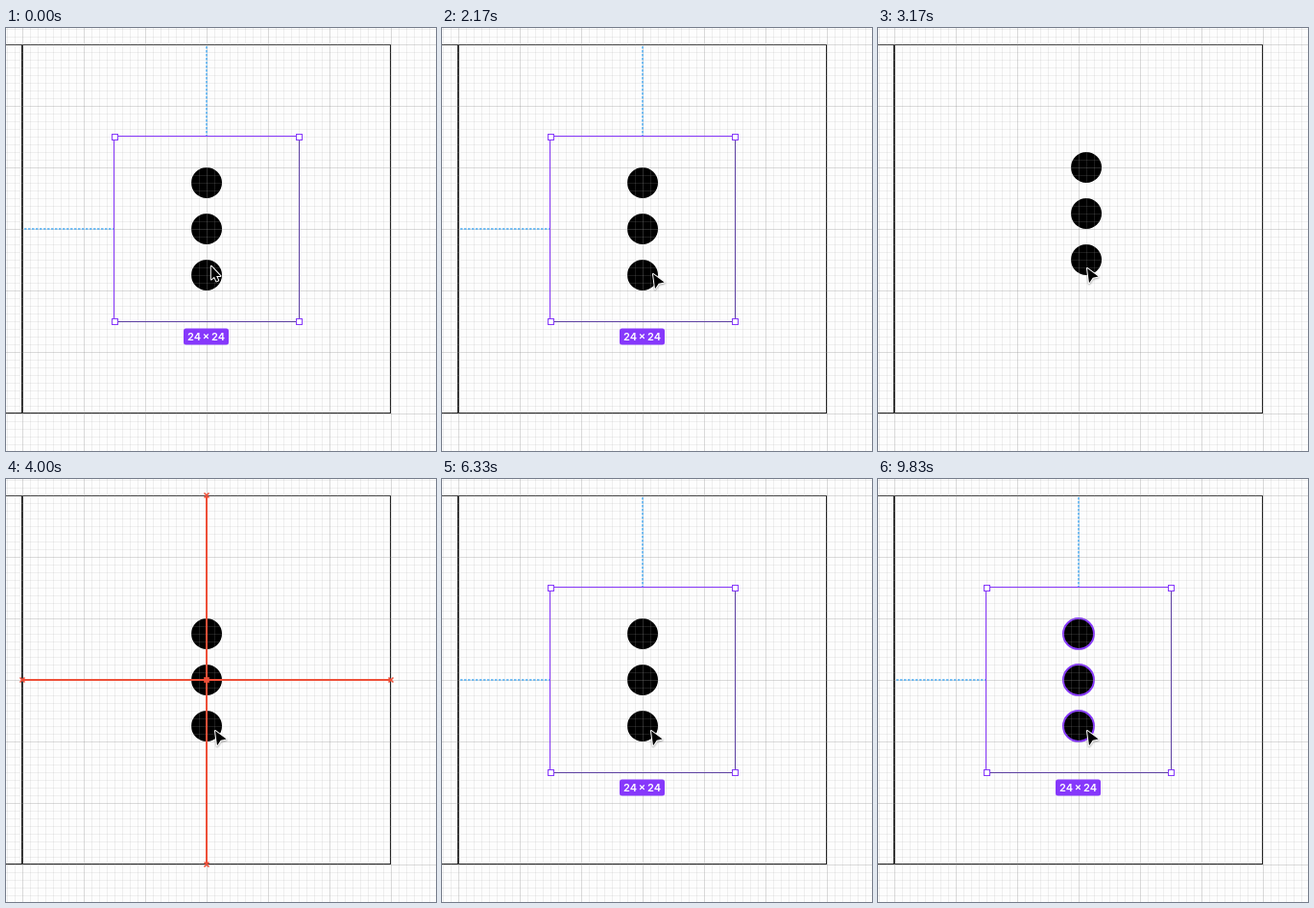
An HTML page with a canvas for the animation above (9.99 s loop, 448x440 px).

```html
<!DOCTYPE html>
<html lang="en">
<head>
<meta charset="utf-8">
<style>
  html, body { margin: 0; width: 100%; height: 100%; overflow: hidden; background: #fdfdfd; }
  canvas { display: block; }
</style>
</head>
<body>
<canvas id="stage" width="448" height="440"></canvas>
<script>
const ctx = document.getElementById('stage').getContext('2d');
const LOOP = 9990, STEP = 1000 / 6;
const CENTER = 209, START = 17, END = 401, SIZE = END - START, UNIT = 8;
const PURPLE = '#8638fb', SHADE = '#5b3fa0', RED = '#ee4f38', BLUE = '#4fadf2';
const GRAB = { x: 213, y: 265 };

const systemArrow = new Path2D('M.8 .8V14.6L4 11.7L6.2 16.4L8.2 15.5L6.1 10.9H10.4Z');
const editorArrow = new Path2D('M1 1L12.6 9.6L6.8 10.8L3 16.2Z');

function ease(t, from, to) {
  const p = Math.min(1, Math.max(0, (t - from) / (to - from)));
  return p * p * (3 - 2 * p);
}

// Drift while hovering, pull up to drag, then bring the icon back to the centre.
function cursorAt(t) {
  const drift = ease(t, 330, 1670), pull = ease(t, 2160, 2500), back = ease(t, 3160, 4000);
  return {
    x: 213 + 6 * drift - 1.7 * pull - .5 * back,
    y: 247 + 8 * drift - 6 * pull + 12 * back
  };
}

const snap = distance => Math.round(distance / UNIT) * UNIT;

function rect(x, y, w, h, color) {
  ctx.fillStyle = color;
  ctx.fillRect(x, y, w, h);
}

function line(x1, y1, x2, y2, color, width = 1, dash = []) {
  ctx.strokeStyle = color;
  ctx.lineWidth = width;
  ctx.setLineDash(dash);
  ctx.beginPath();
  ctx.moveTo(x1, y1);
  ctx.lineTo(x2, y2);
  ctx.stroke();
  ctx.setLineDash([]);
}

function drawFrames() {
  const ink = '#242424';
  rect(0, START, END, 1, ink);
  rect(0, END - 1, END, 1, ink);
  rect(START - 1, START, 2, SIZE, ink);
  rect(END - 1, START, 1, SIZE, ink);
}

function drawDots(dx, dy, hovered) {
  for (const gap of [-48, 0, 48]) {
    ctx.beginPath();
    ctx.arc(CENTER + dx, CENTER + gap + dy, 16, 0, 7);
    ctx.fillStyle = '#000';
    ctx.fill();
    if (hovered) {
      ctx.strokeStyle = PURPLE;
      ctx.lineWidth = 2;
      ctx.stroke();
    }
  }
}

function drawGrid() {
  for (let p = START % UNIT; p < 448; p += UNIT) {
    const color = (p - START) % 64 ? 'rgba(165,165,165,.17)' : 'rgba(140,140,140,.31)';
    rect(p, 0, 1, 440, color);
    rect(0, p, 448, 1, color);
  }
}

function drawSelection() {
  const near = CENTER - 96, far = CENTER + 96;
  line(START + 2, CENTER, near - 1, CENTER, BLUE, 1.5, [2.5, 1.5]);
  line(CENTER, START + 2, CENTER, near - 1, BLUE, 1.5, [2.5, 1.5]);
  rect(far, near, 1, 193, SHADE);
  rect(near, far, 193, 1, SHADE);
  rect(near - 1, near - 1, 1, 194, PURPLE);
  rect(near - 1, near - 1, 194, 1, PURPLE);
  ctx.strokeStyle = PURPLE;
  ctx.lineWidth = 1;
  for (const x of [near, far]) {
    for (const y of [near, far]) {
      rect(x - 3, y - 3, 7, 7, '#fff');
      ctx.strokeRect(x - 2.5, y - 2.5, 6, 6);
    }
  }
  ctx.fillStyle = PURPLE;
  ctx.beginPath();
  ctx.roundRect(185, 312.5, 47, 17, 2.5);
  ctx.fill();
  ctx.fillStyle = '#fff';
  ctx.font = '600 11px Inter, sans-serif';
  ctx.textAlign = 'center';
  ctx.fillText('24\u2009×\u200924', 208.5, 325);
}

function drawCross(x, y) {
  line(x - 2.5, y - 2.5, x + 2.5, y + 2.5, RED, 1.6);
  line(x - 2.5, y + 2.5, x + 2.5, y - 2.5, RED, 1.6);
}

function drawGuides(dx, dy) {
  if (dx === 0) {
    line(CENTER, START, CENTER, END, RED, 2);
    for (const y of [START, CENTER + dy, END]) drawCross(CENTER, y);
  }
  if (dy === 0) {
    line(START, CENTER, END, CENTER, RED, 2);
    for (const x of [START, CENTER + dx, END]) drawCross(x, CENTER);
  }
}

function drawCursor({ x, y }, arrow) {
  ctx.save();
  ctx.translate(Math.round(x), Math.round(y));
  ctx.lineJoin = 'round';
  ctx.lineWidth = 2;
  ctx.strokeStyle = '#fff';
  ctx.shadowColor = 'rgba(0,0,0,.35)';
  ctx.shadowBlur = 2;
  ctx.shadowOffsetY = 1;
  ctx.stroke(arrow);
  ctx.shadowColor = 'transparent';
  ctx.fillStyle = '#000';
  ctx.fill(arrow);
  ctx.restore();
}

function draw(now) {
  const t = Math.floor((now % LOOP + 5) / STEP) * STEP;
  const cursor = cursorAt(t);
  const dragging = t > 2490 && t < 6320;
  const dx = dragging ? snap(cursor.x - GRAB.x) : 0;
  const dy = dragging ? snap(cursor.y - GRAB.y) : 0;
  rect(0, 0, 448, 440, '#fdfdfd');
  drawFrames();
  drawDots(dx, dy, t > 9660);
  drawGrid();
  if (dragging) drawGuides(dx, dy);
  else drawSelection();
  drawCursor(cursor, t < STEP ? systemArrow : editorArrow);
}

const start = performance.now();
function tick() {
  draw(performance.now() - start);
  requestAnimationFrame(tick);
}
tick();
</script>
</body>
</html>
```
